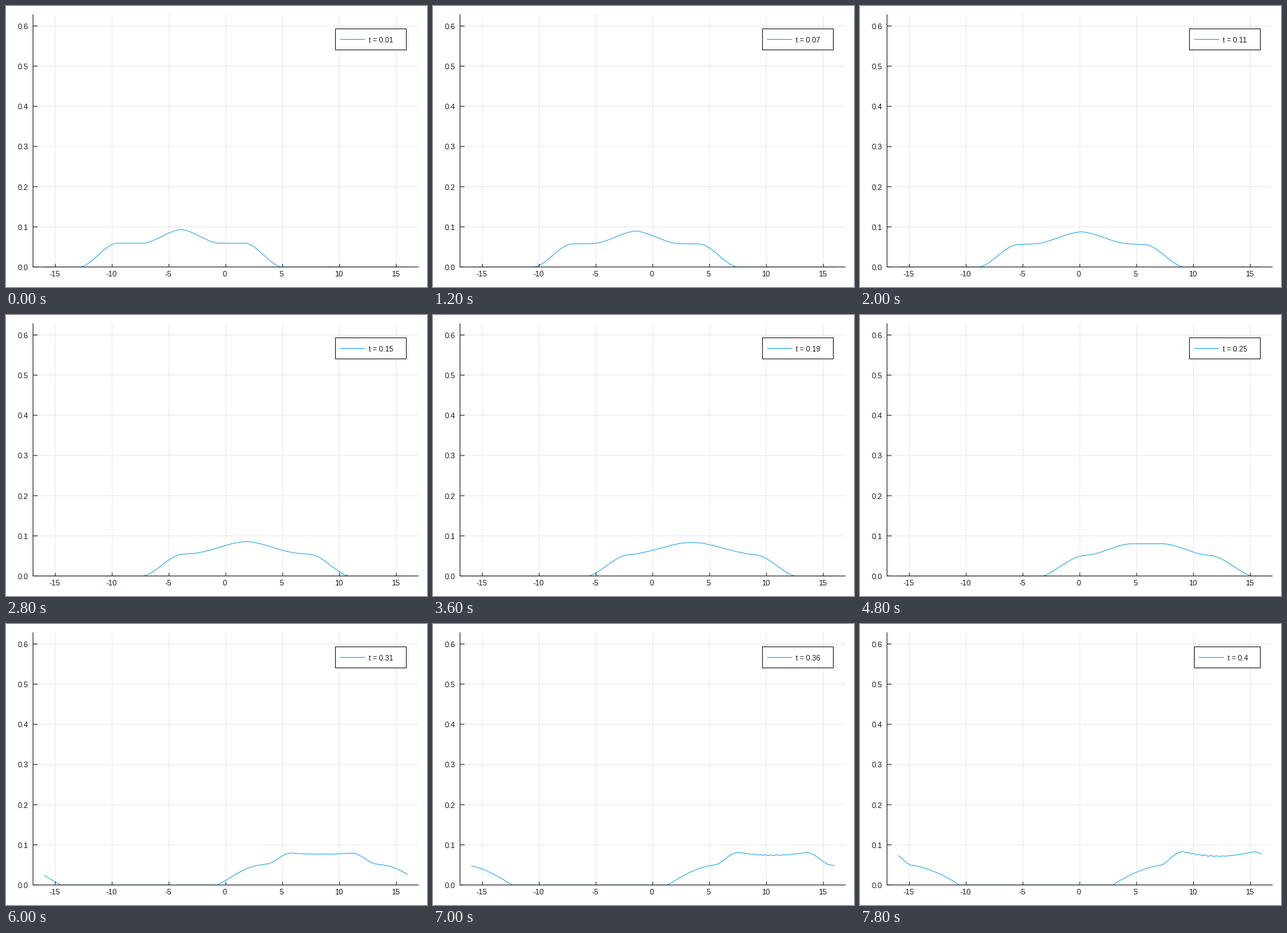
Write a matplotlib script that moves like this. It is 600 px wide and 400 px high and loops after 8 s.

```python
import numpy as np
import matplotlib.pyplot as plt
from matplotlib.animation import FuncAnimation
from matplotlib.patches import Rectangle

DPI = 100
PX = 72 / DPI
BASE = 371.5
BLUE, INK = "#009afa", "#000000"
FRAMES, STEP = 40, 200
GRID = np.linspace(54.5, 572.5, 257)
PERIOD = 520


def smooth(x):
    x = np.clip(x, 0, 1)
    return x * x * (3 - 2 * x)


def wave(t):
    """Curve in pixels: a wide plateau carrying a hump, drifting right."""
    p = (t - 0.01) / 0.39
    late = np.clip((p - 0.6) / 0.4, 0, 1) ** 1.5
    width = 291 + 10 * p * p
    dist = (GRID - 103.8 - 658 * (t - 0.01)) % PERIOD
    d = np.abs(dist - width / 2)
    s = np.maximum(width / 2 - d, 0)

    # plateau: steep S-shaped flanks relax into rounded ones
    round_edge = 1 - (1 - np.minimum(s / 90, 1)) ** 2
    q = p ** 1.2
    h = (33.8 - 3.8 * p) * ((1 - q) * smooth(s / 55) + q * round_edge)

    # hump: spreads, steepens and finally sinks in the middle
    half = 27 + 38 * smooth(p)
    soft = np.interp(p, [0, 0.46, 0.77], [58, 86, 35])
    top = 19.6 - 8.6 * p + 11 * late * (d / half) ** 2
    h += top * smooth((half - d) / soft + 0.5)

    # fine ripples near the end
    ripple = np.sin(2 * np.pi * dist / 8.1)
    h += 0.8 * late * ripple * np.exp(-((dist - 150 + 28 * late) / 36) ** 4)
    return BASE - h


fig = plt.figure(figsize=(600 / DPI, 400 / DPI), dpi=DPI, facecolor="white")
ax = fig.add_axes([0, 0, 1, 1])
ax.set_xlim(0, 600)
ax.set_ylim(400, 0)
ax.axis("off")


def line(xs, ys, color=INK, z=4, **kw):
    return ax.plot(xs, ys, color=color, lw=0.85 * PX, zorder=z, snap=False,
                   solid_capstyle="butt", **kw)[0]


def label(x, y, s, size=11, **kw):
    return ax.text(x, y, s, fontsize=size * PX, family="Liberation Sans",
                   color="#1a1a1a", va="baseline", zorder=7, **kw)


for k in range(-3, 4):
    x = 313.2 + 81 * k
    line([x, x], [12, 371], alpha=0.1, z=1)
    line([x, x], [371, 367])
    label(x - 1.2, 385, str(5 * k), ha="center")
for k in range(7):
    y = BASE - 57.17 * k
    if k:
        line([39, 588], [y, y], alpha=0.1, z=1)
    line([39, 45], [y, y])
    label(32, y + 4.5, f"{k / 10:.1f}", ha="right")
line([38.5, 38.5], [12, 372])
line([38, 588], [BASE, BASE])

curve = line(GRID, wave(0.01), BLUE, 3)
box = ax.add_patch(Rectangle((469.5, 32.5), 101, 30, fc="white", ec=INK,
                             lw=0.85 * PX, snap=False, zorder=5))
key = line([476, 512], [47.5, 47.5], BLUE, 6)
name = label(517, 52, "", 10.4)


def draw(n):
    t = round(0.01 * (n + 1), 2)
    text = f"t = {t}"
    shift = 7 if len(text) < 8 else 0
    curve.set_ydata(wave(t))
    box.set_x(469.5 + shift)
    box.set_width(101 - shift)
    key.set_xdata([476 + shift, 512 + shift])
    name.set_text(text)
    name.set_x(517 + shift)
    return curve, box, key, name


anim = FuncAnimation(fig, draw, frames=FRAMES, interval=STEP,
                     repeat=True, repeat_delay=0, blit=False)
plt.show()
```
